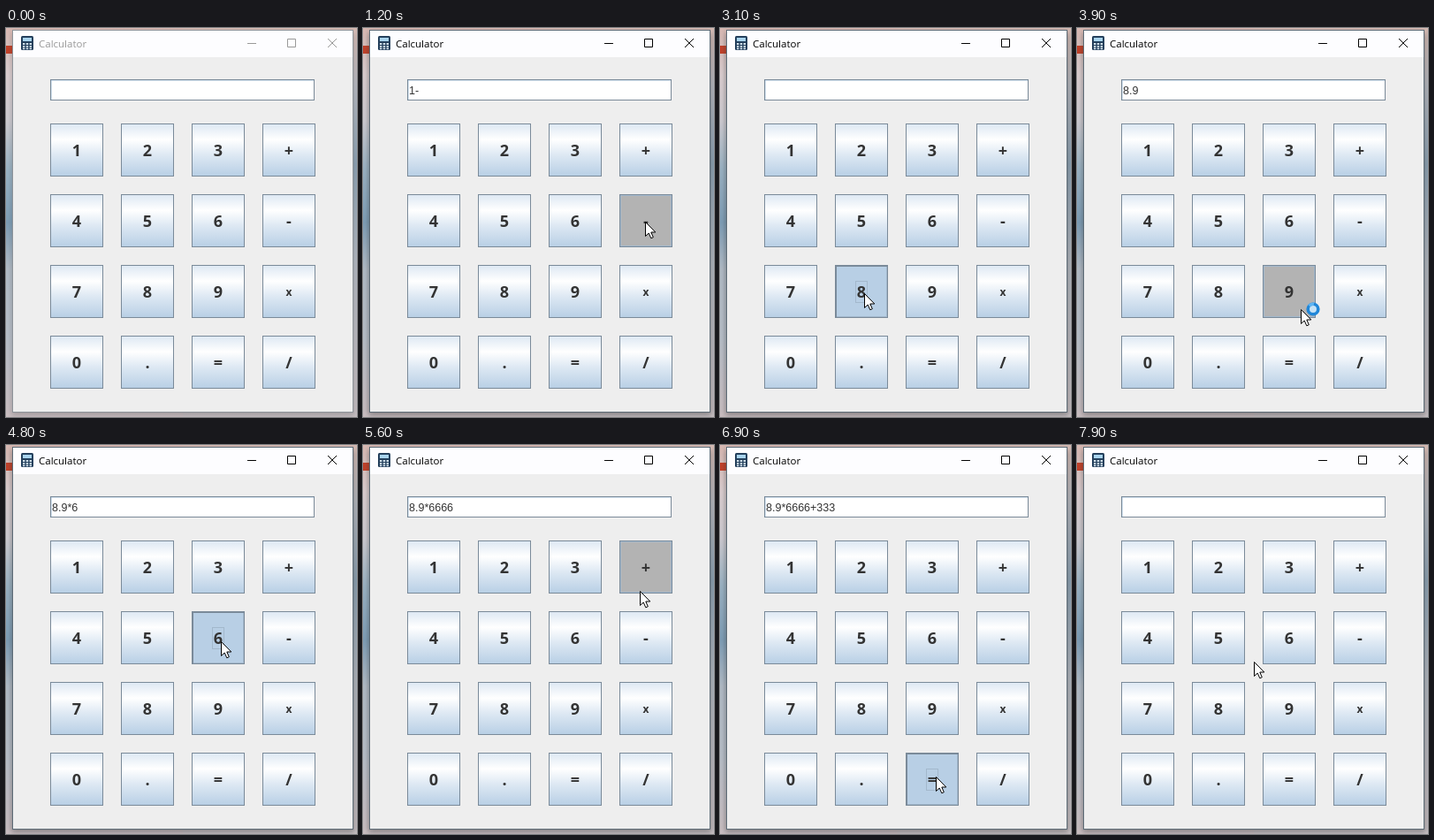
Recreate the animation shown at these times as an HTML page. Size 397 by 440 pixels, loop 8 s.

```html
<!DOCTYPE html>
<html lang="en">
<head>
<meta charset="utf-8">
<title>Calculator</title>
<style>
  html, body { margin: 0; width: 100%; height: 100%; overflow: hidden; }
  svg { display: block; width: 397px; height: 440px; }
  text { fill: #333; }
  .ui { font: 11.5px "Open Sans", "Noto Sans", sans-serif; }
  .cjk { font: 12px "Noto Sans CJK SC", "Noto Sans CJK", sans-serif; fill: #111; }
  .field { font: 12.5px "Liberation Sans", Arial, sans-serif; }
  .label { font: bold 12px "Liberation Sans", Arial, sans-serif; }
  .key { font: bold 18px "Open Sans", "Noto Sans", sans-serif; text-anchor: middle; }
  .key.small { font-size: 12px; }
  .face { fill: url(#ocean); stroke: #7a8a99; }
  .inner, .press, .focus { fill: none; visibility: hidden; }
  .inner, .focus { stroke: #a3b8cc; }
  .press { stroke: #7a8a99; }
  .hover .face { fill: #b3b3b3; }
  .hover .inner { visibility: visible; }
  .pressed .face { fill: #b8cfe5; }
  .pressed .press, .pressed .focus { visibility: visible; }
  #controls { fill: none; stroke: #000; }
  #frame { fill: #eee; stroke: #5c6a75; }
  #caption { fill: #000; }
  .inactive #controls { stroke: #999; }
  .inactive #caption { fill: #999; }
  .inactive #frame { stroke: #8d9399; }
  .inactive #shade { opacity: .45; }
</style>
</head>
<body>
<svg id="stage" viewBox="0 0 397 440" class="inactive">
  <defs>
    <linearGradient id="ocean" x2="0" y2="1">
      <stop stop-color="#dde8f3"/>
      <stop offset=".3" stop-color="#fff"/>
      <stop offset=".6" stop-color="#dde8f3"/>
      <stop offset="1" stop-color="#b8cfe5"/>
    </linearGradient>
    <linearGradient id="skyLeft" x2="0" y2="1">
      <stop stop-color="#d9b9b3"/>
      <stop offset=".12" stop-color="#ddd0d2"/>
      <stop offset=".24" stop-color="#cfcdd3"/>
      <stop offset=".36" stop-color="#9db5c6"/>
      <stop offset=".5" stop-color="#7f9fb8"/>
      <stop offset=".62" stop-color="#b3bdc8"/>
      <stop offset=".8" stop-color="#b9c0ca"/>
      <stop offset="1" stop-color="#cbbfc2"/>
    </linearGradient>
    <linearGradient id="skyRight" x2="0" y2="1">
      <stop stop-color="#d8bcb5"/>
      <stop offset=".15" stop-color="#b9bcc4"/>
      <stop offset=".35" stop-color="#8fa5b7"/>
      <stop offset=".6" stop-color="#b5bbc4"/>
      <stop offset="1" stop-color="#c8c0c4"/>
    </linearGradient>
    <filter id="soft" x="-10%" y="-10%" width="120%" height="120%">
      <feGaussianBlur stdDeviation="3"/>
    </filter>
  </defs>

  <rect width="200" height="440" fill="url(#skyLeft)"/>
  <rect x="200" width="197" height="440" fill="url(#skyRight)"/>
  <rect y="20" width="8" height="9" fill="#c4422a"/>
  <rect id="shade" x="6" y="5" width="388" height="433" opacity=".75" fill="#333" fill-opacity=".6" filter="url(#soft)"/>

  <rect id="frame" x="7.5" y="2.5" width="385" height="432"/>
  <rect x="8" y="3" width="384" height="30" fill="#fdfdff"/>
  <rect x="17" y="9" width="14" height="16" rx="1.5" fill="#24405c"/>
  <rect x="19" y="11" width="10" height="4" fill="#a9d4ee"/>
  <path d="M19 18h10M19 20.8h10M19 23.4h10" stroke="#d5e3ee" stroke-width="1.8" stroke-dasharray="2.4 1.4"/>
  <text id="caption" class="ui" x="37" y="22">Calculator</text>
  <path id="controls" d="M273 17.5h10M318.500 12.500h9v9h-9zM364 12l10 10M374 12l-10 10"/>

  <rect x="50.500" y="58.500" width="298" height="23" fill="#fff" stroke="#7a8a99"/>
  <path d="M51 59.500h297M51.500 59v22" stroke="#b8cfe5" stroke-opacity=".6"/>
  <text id="entry" class="field" x="52" y="75"></text>

  <g id="keys"></g>

  <g id="dialog">
    <rect x="70" y="161" width="261" height="119" fill="#000" fill-opacity=".5" filter="url(#soft)"/>
    <rect x="69.500" y="158.500" width="260" height="120" fill="#eee" stroke="#59636b"/>
    <rect x="70" y="159" width="259" height="30" fill="#fff"/>
    <text class="cjk" x="78" y="178">提示信息</text>
    <path d="M309.500 168.500l10 10M319.500 168.500l-10 10" stroke="#111"/>
    <circle cx="95.500" cy="213.500" r="13" fill="#999" fill-opacity=".6"/>
    <circle cx="94" cy="212" r="12.500" fill="#ccccfa" stroke="#7f7fa6" stroke-width="1.500"/>
    <path d="M87 206a10 10 0 0 1 14 0" fill="none" stroke="#fff" stroke-opacity=".7" stroke-width="3"/>
    <text x="94" y="219" text-anchor="middle" style="font:bold 20px 'Liberation Sans',sans-serif;fill:#5c5c9c">i</text>
    <text id="result" class="label" x="127" y="220"></text>
    <g id="ok">
      <rect class="face" x="181" y="241" width="37" height="23" stroke-width="2"/>
      <rect x="190.500" y="244.500" width="18" height="16" fill="none" stroke="#a3b8cc"/>
      <text class="label" x="199.500" y="257" text-anchor="middle">OK</text>
    </g>
  </g>

  <g id="cursor">
    <path d="M.500 .500V16.500L4.200 13L6.800 18.800L9.300 17.700L6.800 12H11.800Z" fill="#fff" stroke="#000"/>
    <g id="busy">
      <circle cx="14" cy="0" r="5.800" fill="#c5e2f6" stroke="#1f86d8" stroke-width="3.600"/>
      <path d="M9.600 -3.800A5.800 5.800 0 0 1 15 -5.700" fill="none" stroke="#5fb4f2" stroke-width="3.600"/>
    </g>
  </g>
</svg>

<script>
const $ = id => document.getElementById(id);
const STEP = 100, STEPS = 80, SIZE = 60;

const keys = [...'123+456-789x0.=/'].map((label, i) => ({
  label, x: 50 + i % 4 * 80, y: 108 + Math.floor(i / 4) * 80
}));

$('keys').innerHTML = keys.map(({ label, x, y }) => `
  <g>
    <rect class="face" x="${x + .5}" y="${y + .5}" width="59" height="59"/>
    <rect class="inner" x="${x + 1.5}" y="${y + 1.5}" width="57" height="57"/>
    <path class="press" d="M${x + 1} ${y + 1.5}h58M${x + 1.5} ${y + 1}v58"/>
    <rect class="focus" x="${x + 23.5}" y="${y + 18.5}" width="13" height="24"/>
    <text class="key ${label === 'x' ? 'small' : ''}" x="${x + 30}"
      y="${y + (label === 'x' ? 35 : 37)}">${label}</text>
  </g>`).join('');
keys.forEach((key, i) => key.node = $('keys').children[i]);

// Pointer waypoints: step, x, y
const path = [
  [1, 300, 425], [5, 85, 145], [7, 85, 145], [10, 319, 219], [12, 319, 219],
  [14, 245, 220], [16, 245, 220], [18, 228, 365], [22, 228, 365],
  [25, 200, 248], [28, 200, 248], [30, 163, 300], [32, 163, 300],
  [33, 161, 372], [35, 161, 372], [36, 213, 331], [37, 253, 318],
  [39, 253, 318], [41, 318, 300], [43, 318, 300], [45, 243, 222],
  [54, 243, 222], [56, 313, 165], [58, 313, 165], [59, 271, 150],
  [60, 245, 140], [66, 245, 140], [68, 244, 375], [72, 244, 375],
  [75, 200, 245], [80, 200, 245]
];

// Press steps; the typed character follows one step later
const clicks = [
  [6, '1'], [11, '-'], [15, '6'], [31, '8'], [34, '.'], [38, '9'], [42, 'x'],
  [45, '6', true], [48, '6'], [51, '6'], [53, '6'], [57, '+'],
  [61, '3'], [63, '3'], [65, '3'], [19, '='], [69, '=']
];

const dialogs = [
  { from: 20, ok: 26, text: '-5' },
  { from: 70, ok: 76, text: '59660.4' }
];

function pointerAt(step) {
  const i = Math.max(1, path.findIndex(p => p[0] >= step));
  const [t0, x0, y0] = path[i - 1], [t1, x1, y1] = path[i];
  const k = (step - t0) / (t1 - t0);
  return [Math.round(x0 + (x1 - x0) * k), Math.round(y0 + (y1 - y0) * k)];
}

function entryAt(step) {
  const clearedAt = dialogs.reduce((last, d) => step >= d.ok + 3 ? d.ok + 3 : last, 0);
  return clicks
    .filter(([at, label]) => label !== '=' && at >= clearedAt && at < step)
    .map(([, label]) => label === 'x' ? '*' : label).join('');
}

function opacityAt(step, { from, ok }) {
  return step > ok ? [.6, .2][step - ok - 1] : [0, .4, .86][step - from] ?? 1;
}

function render(step) {
  const [px, py] = pointerAt(step);
  const dialog = dialogs.find(d => step >= d.from && step < d.ok + 3);
  const pressed = clicks.find(([at, , quick]) => at === step && !quick)?.[1];

  $('stage').classList.toggle('inactive', step < 6 || !!dialog);
  $('entry').textContent = entryAt(step);

  for (const { label, x, y, node } of keys) {
    const inside = px >= x && px < x + SIZE && py >= y && py < y + SIZE;
    const hover = step > 0 && inside && (!dialog || label === '=');
    node.classList.toggle('hover', hover);
    node.classList.toggle('pressed', label === pressed);
  }

  $('dialog').style.opacity = dialog ? opacityAt(step, dialog) : 0;
  $('result').textContent = dialog ? dialog.text : '';
  $('ok').classList.toggle('pressed', dialog?.ok === step);

  $('cursor').setAttribute('transform', `translate(${px} ${py})`);
  $('cursor').style.visibility = step ? 'visible' : 'hidden';
  $('busy').style.display = step >= 38 && step <= 40 ? '' : 'none';
}

let shown = -1;
const start = performance.now();
function tick() {
  const step = Math.floor((performance.now() - start) / STEP) % STEPS;
  if (step !== shown) render(shown = step);
  requestAnimationFrame(tick);
}
tick();
</script>
</body>
</html>
```
